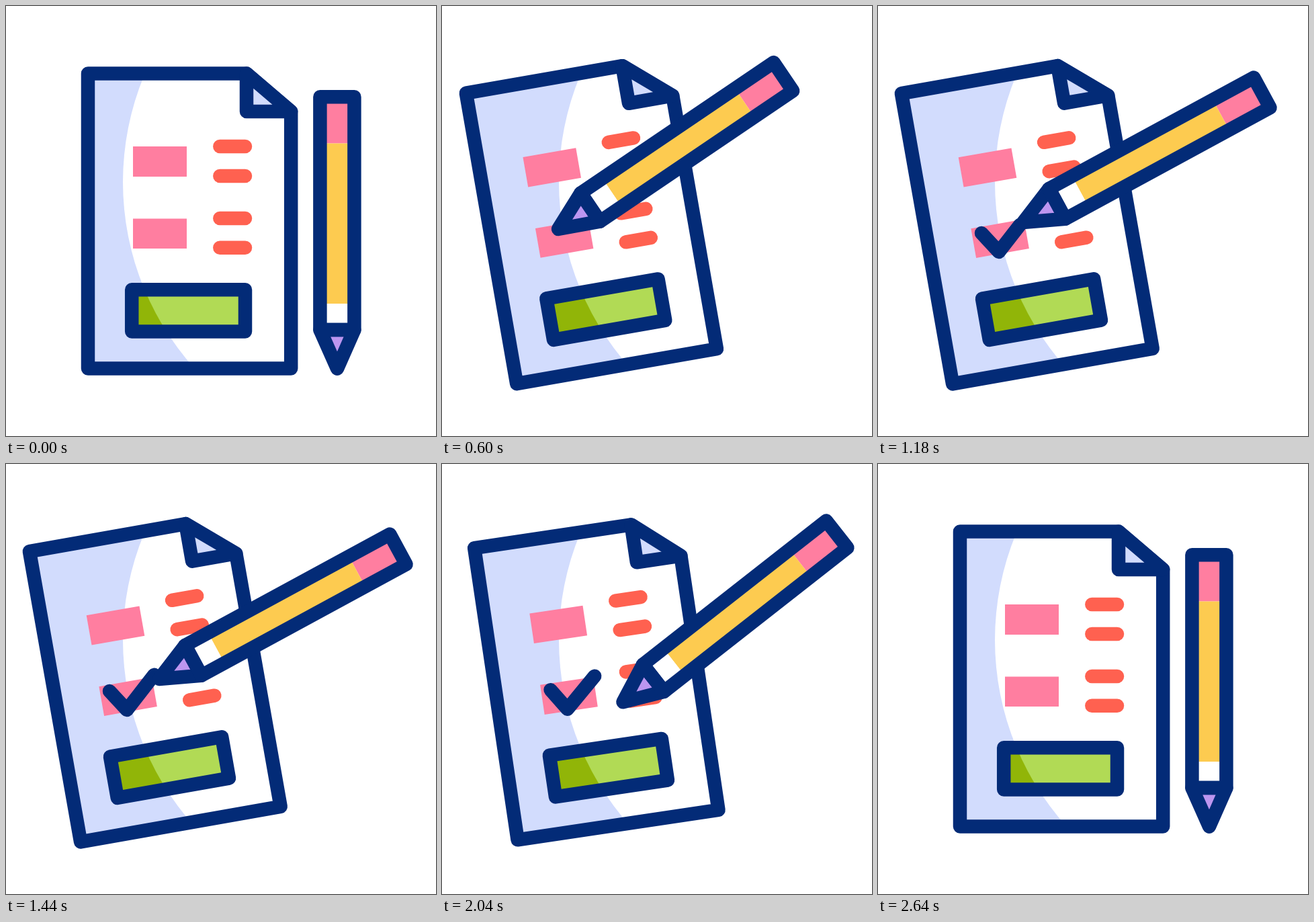
Write an HTML page with a canvas that moves like this. It is 640x640 px and loops after 2820 ms.

```html
<!DOCTYPE html>
<html lang="en">
<head>
<meta charset="utf-8">
<title>Checklist</title>
<style>
html, body { margin: 0; width: 100%; height: 100%; overflow: hidden; background: #fff; }
canvas { display: block; width: 100%; height: 100%; }
</style>
</head>
<body>
<canvas id="stage" width="640" height="640"></canvas>
<script>
const ctx = document.getElementById('stage').getContext('2d');
const LOOP = 2820, STEP = 20, LINE = 20.5;
const NAVY = '#032b77', BLUE = '#d2dcfd', PINK = '#ff7ea0', RED = '#ff6150',
      YELLOW = '#fdcb50', PURPLE = '#bd96f0', GREEN = '#b1da55', MOSS = '#91b508';

// Pencil: time, tip x, tip y, tilt in degrees
const KEYS = [
  [0, 493, 539.7, 0],
  [120, 374, 457, 21],
  [280, 252, 383, 42.1],
  [600, 173, 332, 55.9],
  [740, 157, 342, 58.3],
  [950, 181, 367, 60.6],
  [1080, 202, 339, 61.3],
  [1180, 216, 322, 61.5],
  [1340, 228, 320, 61.5]
];
const CHECK = [[203.2, 326], [223.9, 358], [272.9, 313.7]];
const CHECK_LEN = 104.2;

const clamp = v => Math.min(1, Math.max(0, v));
const lerp = (a, b, k) => a + (b - a) * k;
const rad = deg => deg * Math.PI / 180;
const smooth = (t, from, to) => {
  const p = clamp((t - from) / (to - from));
  return p * p * (3 - 2 * p);
};

// Monotone cubic interpolation of one column of KEYS
const secant = (i, c) => (KEYS[i + 1][c] - KEYS[i][c]) / (KEYS[i + 1][0] - KEYS[i][0]);
function slope(i, c) {
  if (i === 0) return secant(0, c);
  if (i === KEYS.length - 1) return 0;
  const a = secant(i - 1, c), b = secant(i, c);
  return a * b > 0 ? 2 * a * b / (a + b) : 0;
}
function track(t, c) {
  const last = KEYS.length - 1;
  if (t >= KEYS[last][0]) return KEYS[last][c];
  let i = 0;
  while (t >= KEYS[i + 1][0]) i++;
  const h = KEYS[i + 1][0] - KEYS[i][0], u = (t - KEYS[i][0]) / h, v = 1 - u;
  return v * v * (1 + 2 * u) * KEYS[i][c] + u * u * (3 - 2 * u) * KEYS[i + 1][c]
    + h * u * v * (v * slope(i, c) - u * slope(i + 1, c));
}

function poly(points, close) {
  ctx.beginPath();
  points.forEach(p => ctx.lineTo(p[0], p[1]));
  if (close) ctx.closePath();
}
function fill(color) {
  ctx.fillStyle = color;
  ctx.fill();
}
function stroke(color) {
  ctx.strokeStyle = color;
  ctx.stroke();
}
function rect(x, y, w, h, color) {
  ctx.fillStyle = color;
  ctx.fillRect(x, y, w, h);
}

// Fills the current path; the lit disc inside it stays fixed to the stage
function lit(shade, light) {
  fill(shade);
  ctx.save();
  ctx.clip();
  ctx.setTransform(1, 0, 0, 1, 0, 0);
  ctx.beginPath();
  ctx.arc(588, 262, 414, 0, 7);
  fill(light);
  ctx.restore();
}

function drawPage(k, drawn) {
  ctx.save();
  ctx.translate(273 - 51.3 * k, 320);
  ctx.rotate(rad(-10 * k));
  ctx.translate(-273, -320);

  const sheet = [[122, 100.5], [358, 100.5], [424.2, 157], [424.2, 539.5], [122, 539.5]];
  poly(sheet, true);
  lit(BLUE, '#fff');
  poly(sheet, true);
  stroke(NAVY);
  poly([[358, 100.5], [424.2, 157], [358, 157]], true);
  fill(BLUE);
  stroke(NAVY);

  rect(189, 209, 80, 45, PINK);
  rect(189, 316.5, 80, 44.5, PINK);
  for (const y of [209, 253, 316, 359.7]) {
    poly([[318.3, y], [356, y]]);
    stroke(RED);
  }

  ctx.beginPath();
  ctx.rect(187.2, 422.2, 168.8, 62.4);
  lit(MOSS, GREEN);
  ctx.strokeStyle = NAVY;
  ctx.strokeRect(187.2, 422.2, 168.8, 62.4);

  if (drawn > 0) {
    ctx.setLineDash([CHECK_LEN * drawn, 2 * CHECK_LEN]);
    poly(CHECK);
    stroke(NAVY);
  }
  ctx.restore();
}

function drawPencil(x, y, tilt) {
  ctx.save();
  ctx.translate(x, y);
  ctx.rotate(rad(tilt));
  ctx.translate(-493, -539.7);
  rect(467, 135, 52, 69.5, PINK);
  rect(467, 204.5, 52, 238.5, YELLOW);
  rect(467, 443, 52, 39, '#fff');
  poly([[467.4, 482], [518.4, 482], [493, 539.7]], true);
  fill(PURPLE);
  stroke(NAVY);
  poly([[467.4, 135.2], [518.4, 135.2], [518.4, 482], [467.4, 482]], true);
  stroke(NAVY);
  ctx.restore();
}

function draw(t) {
  const back = smooth(t, 1840, 2640);
  const turn = (1 - Math.pow(1 - clamp(t / 1000), 4.9)) * (1 - back);
  const drawn = smooth(t, 680, 1340) - smooth(t, 1980, 2640);
  const pose = [1, 2, 3].map(c => lerp(track(t, c), KEYS[0][c], back));

  rect(0, 0, 640, 640, '#fff');
  ctx.lineWidth = LINE;
  ctx.lineCap = ctx.lineJoin = 'round';
  drawPage(turn, drawn);
  drawPencil(...pose);
}

const start = performance.now();
function frame() {
  const t = (performance.now() - start) % LOOP;
  draw(Math.floor(t / STEP) * STEP);
  requestAnimationFrame(frame);
}
frame();
</script>
</body>
</html>
```
